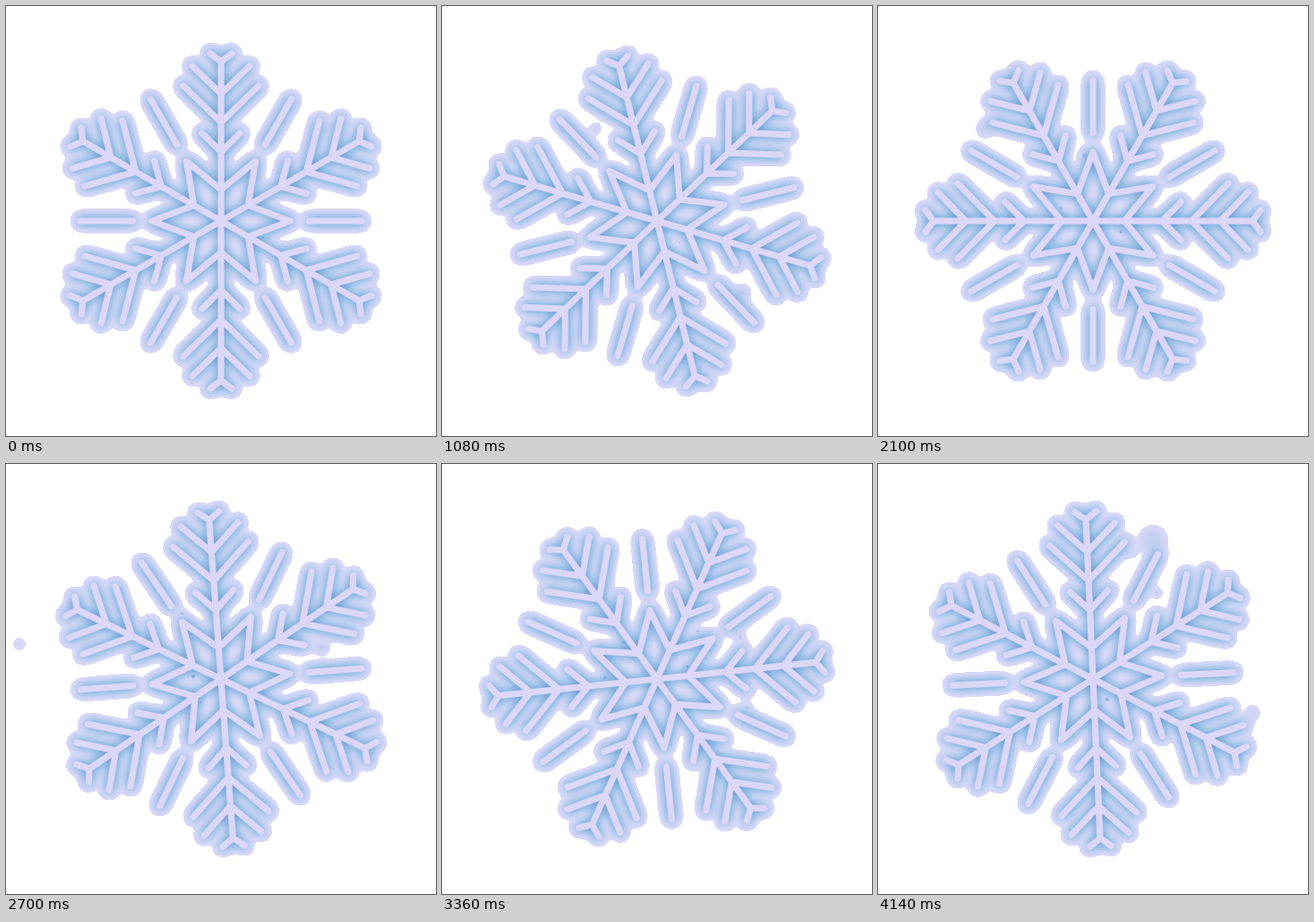
An HTML page for the animation above (4.2 s loop, 480 by 480 pixels).

```html
<!DOCTYPE html>
<html lang="en">
<head>
<meta charset="utf-8">
<title>Turning snowflake</title>
<style>
  html, body { margin: 0; height: 100%; overflow: hidden; background: #fff; }
  svg { display: block; width: 100%; height: 100%; }
</style>
</head>
<body>
<svg viewBox="-240 -240 480 480">
  <defs>
    <!-- Blur the shapes, colour the blur by its strength, cut it off hard at the rim -->
    <filter id="frost" color-interpolation-filters="sRGB">
      <feGaussianBlur in="SourceAlpha" stdDeviation="6" result="soft"/>
      <feColorMatrix id="spread"/>
      <feComponentTransfer result="tint">
        <feFuncR type="table" tableValues=".88 .62 .46 .36"/>
        <feFuncG type="table" tableValues=".86 .76 .65 .57"/>
        <feFuncB type="table" tableValues=".98 .91 .85 .82"/>
      </feComponentTransfer>
      <feComponentTransfer in="soft" result="rim">
        <feFuncA type="discrete" id="cut"/>
      </feComponentTransfer>
      <feComposite in="tint" in2="rim" operator="in"/>
    </filter>
    <path id="flake" fill="none" stroke="#dcd6f7" stroke-width="7.2"
          stroke-linecap="round" stroke-linejoin="round"/>
  </defs>
  <g filter="url(#frost)"><use href="#flake"/><g id="dust"></g></g>
  <g id="cores" fill="#6597d6"></g>
  <use href="#flake"/>
</svg>
<script>
const LOOP = 4200, STEP = 60, LIFE = 360;
const $ = id => document.getElementById(id);
$('spread').setAttribute('values', '0 0 0 1 0 '.repeat(3) + '0 0 0 0 1');
$('cut').setAttribute('tableValues', '0' + ' 1'.repeat(31));

// One arm points up; each V is [half width, tip height, joint height].
const vees = [[12, 187, 178], [32, 173, 142], [42, 151, 110], [21, 98, 77]];

function flakePath() {
  let d = '', star = '';
  for (let i = 0; i < 6; i++) {
    const arm = i * Math.PI / 3, gap = arm + Math.PI / 6;
    const at = (x, up, a = arm) => [
      x * Math.cos(a) + up * Math.sin(a),
      x * Math.sin(a) - up * Math.cos(a)
    ].map(v => v.toFixed(2)).join(' ');
    d += `M0 0L${at(0, 178)}`;
    for (const [w, tip, joint] of vees)
      d += `M${at(-w, tip)}L${at(0, joint)}L${at(w, tip)}`;
    d += `M${at(0, 98.5, gap)}L${at(0, 157, gap)}`;
    star += `${i ? 'L' : 'M'}${at(0, 35)}L${at(0, 77, gap)}`;
  }
  return d + star + 'Z';
}
$('flake').setAttribute('d', flakePath());

function circle(parent) {
  const c = document.createElementNS('http://www.w3.org/2000/svg', 'circle');
  $(parent).append(c);
  return c;
}
function place(c, cx, cy, r, opacity) {
  const values = { cx, cy, r, opacity };
  for (const key in values) c.setAttribute(key, values[key]);
}

const specks = [];
function addSpeck(peak, x, y, r = 2, alpha = 1) {
  specks.push({ peak, x, y, r, alpha, glow: circle('dust'), core: circle('cores') });
}

// Far specks, by the time they are largest: [x, y, radius, opacity]
const far = {
  600: [[115, 20]],
  1080: [[-69, -103], [95, 80, 3]],
  2100: [[-120, -103, 5, .4]],
  2460: [[-40, -234]],
  2700: [[-225, -39], [112, -36, 3]],
  3360: [[93, -47], [100, 32]],
  3960: [[236, -40]],
  4140: [[67, -155, 13, .17], [71, -96], [178, 38, 3.6, .45], [43, -142]]
};
for (const peak in far)
  for (const speck of far[peak]) addSpeck(+peak, ...speck);

// Small specks near the centre
let seed = 7;
const random = () => (seed = seed * 16807 % 2147483647) / 2147483647;
for (let i = 0; i < 44; i++) {
  const a = random() * 2 * Math.PI, d = 22 + 60 * random();
  addSpeck(LIFE + (LOOP - LIFE) * i / 44, d * Math.cos(a), d * Math.sin(a));
}

function draw(t) {
  $('flake').setAttribute('transform', `rotate(${180 * t / LOOP})`);
  for (const s of specks) {
    const dt = t - s.peak, k = 1 + dt / 700;
    const life = Math.max(0, 1 - Math.abs(dt) / LIFE);
    const x = s.x * k, y = s.y * k;
    const near = Math.max(0, 1 - Math.hypot(x, y) / 135);
    place(s.glow, x, y, s.r * Math.sqrt(life), s.alpha);
    place(s.core, x, y, 2.2 * life, near * .8);
  }
}

function tick() {
  const t = performance.now() % LOOP;
  draw(Math.floor(t / STEP) * STEP);
  requestAnimationFrame(tick);
}
tick();
</script>
</body>
</html>
```
